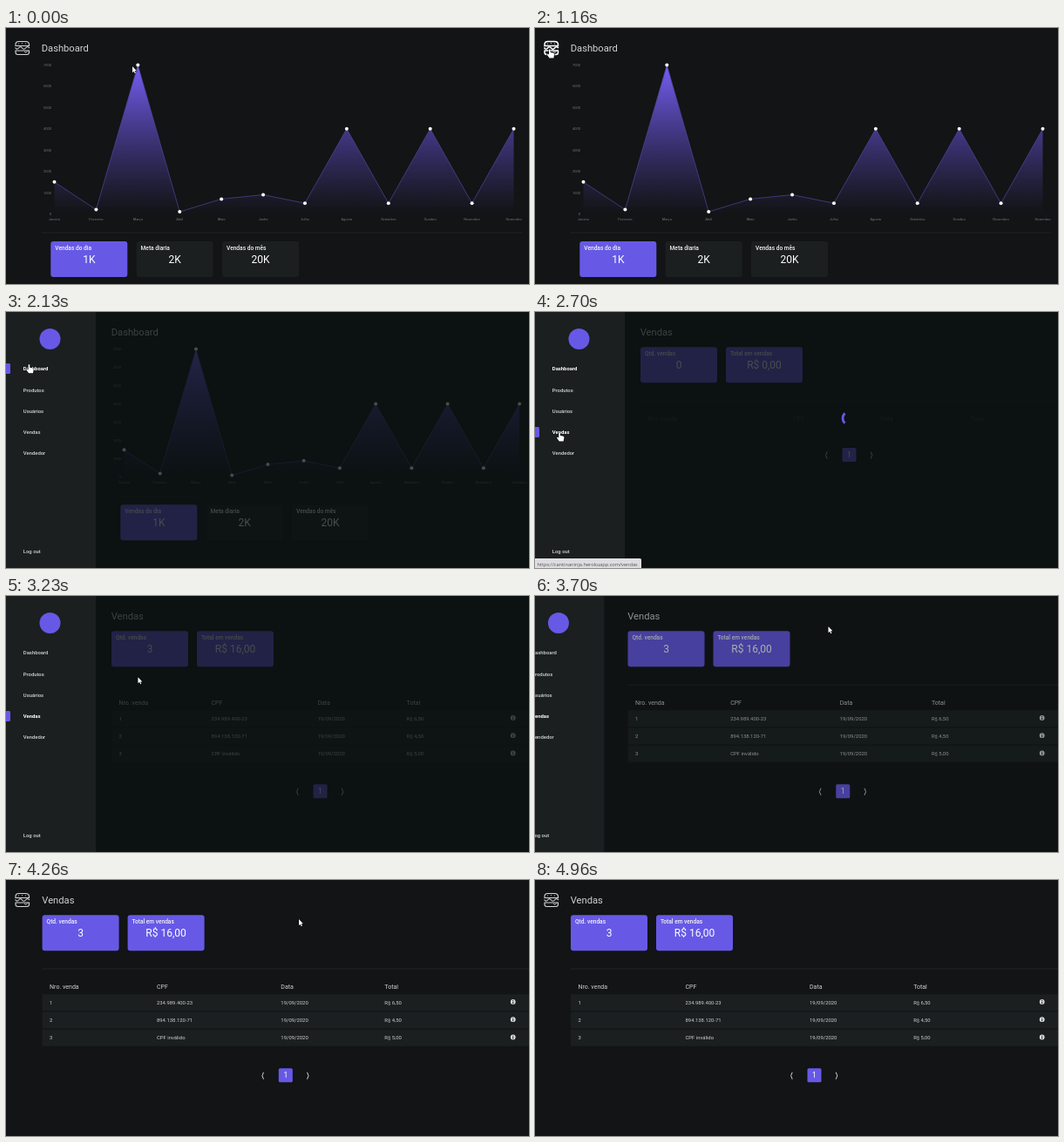
Animation of 600 by 294 pixels, one loop 5 s. Source, as an HTML page with a canvas:

```html
<!DOCTYPE html>
<html lang="pt">
<head>
<meta charset="utf-8">
<title>Dashboard</title>
<style>
html, body { margin: 0; width: 600px; height: 294px; overflow: hidden; background: #121415; }
canvas { display: block; }
</style>
</head>
<body>
<canvas id="stage" width="600" height="294"></canvas>
<script>
const ctx = document.getElementById('stage').getContext('2d');
const LOOP = 5000, SIDE = 103, PURPLE = '#6759e6';
const PAGE_SWITCH = 2680, DATA_READY = 3060;
const months = ['Janeiro', 'Fevereiro', 'Março', 'Abril', 'Maio', 'Junho', 'Julho',
  'Agosto', 'Setembro', 'Outubro', 'Novembro', 'Dezembro'];
const sales = [1500, 200, 7000, 100, 700, 900, 500, 4000, 500, 4000, 500, 4000];
const orders = [
  ['1', '234.989.400-23', '19/09/2020', 'R$ 6,50'],
  ['2', '894.138.120-71', '19/09/2020', 'R$ 4,50'],
  ['3', 'CPF inválido', '19/09/2020', 'R$ 5,00']
];
const menu = [['Dashboard', 67.2], ['Produtos', 91.7], ['Usuários', 115.7], ['Vendas', 140.2],
  ['Vendedor', 164.2], ['Log out', 276.8]];
// pointer path: time, x, y
const path = [[0, 145, 44], [90, 143, 43], [530, 26, 31], [760, 16, 24], [1160, 16, 24], [1300, 19, 24],
  [1960, 19, 24], [2160, 26, 62], [2520, 27.3, 138], [2840, 27.3, 138], [3120, 110, 105],
  [3520, 330, 42], [3700, 336.5, 35], [3940, 336, 45], [5000, 336, 45]];

// cubic-bezier(.25, .8, .25, 1)
function ease(p) {
  if (p <= 0) return 0;
  if (p >= 1) return 1;
  let lo = 0, hi = 1;
  for (let i = 0; i < 20; i++) {
    const u = (lo + hi) / 2;
    if (.75 * u * (1 - u) + u ** 3 < p) lo = u; else hi = u;
  }
  return 2.4 * lo * (1 - lo) ** 2 + 3 * lo * lo * (1 - lo) + lo ** 3;
}

function openness(t, start, openMs, end, closeMs) {
  return t < end ? ease((t - start) / openMs) : 1 - ease((t - end) / closeMs);
}

function pointerAt(t) {
  const i = path.findIndex(p => p[0] > t);
  const [t0, x0, y0] = path[i - 1], [t1, x1, y1] = path[i];
  const p = (t - t0) / (t1 - t0), k = p * p * (3 - 2 * p);
  return [x0 + (x1 - x0) * k, y0 + (y1 - y0) * k];
}

function text(s, x, y, size, color = '#d0d2d3', weight = 400, align = 'left', family = 'Roboto') {
  ctx.font = `${weight} ${size}px ${family}, sans-serif`;
  ctx.fillStyle = color;
  ctx.textAlign = align;
  ctx.fillText(s, x, y);
}

function box(x, y, w, h, color, r = 0) {
  ctx.fillStyle = color;
  ctx.beginPath();
  ctx.roundRect(x, y, w, h, r);
  ctx.fill();
}

function dot(x, y, r, color) {
  ctx.fillStyle = color;
  ctx.beginPath();
  ctx.arc(x, y, r, 0, 7);
  ctx.fill();
}

function stroke(d, color, width) {
  ctx.strokeStyle = color;
  ctx.lineWidth = width;
  ctx.stroke(new Path2D(d));
}

function card(x, y, label, value, color = PURPLE) {
  box(x, y, 88, 41, color, 3);
  text(label, x + 5, y + 10, 6.6, '#f4f4f6', 500);
  text(value, x + 44, y + 25, 12, '#fff', 400, 'center');
}

function burger(hover) {
  const c = hover ? '#fff' : '#d3d7d8', w = hover ? 1.5 : 1.1;
  stroke('M11 20.5V19Q11 15.5 14.5 15.5H22.5Q26.5 15.5 26.5 19V20.5Z', c, w);
  stroke('M10.5 22.5Q12.5 25.5 14.5 23T18.5 23T22.5 23T27 23', c, w);
  stroke('M10.5 26H27M11 26V28Q11 30.5 13.5 30.5H24Q26.5 30.5 26.5 28V26', c, w);
  stroke('M14 18H15M18 17.5H19M22 18H23M21 27L23 28.5L25 26', c, .8);
}

function dashboard(left) {
  text('Dashboard', left - .3, 27, 11.2);
  const x0 = left + 14.5, span = 527 - (left - 41) * .918, h = 171 * span / 527;
  const base = 42.5 + h;
  const px = i => x0 + span * i / 11, py = v => base - h * v / 7000;
  for (let v = 0; v <= 7000; v += 1000) text(v, left + 11, py(v) + 1.5, 4, '#70747a', 400, 'right');
  const line = new Path2D(sales.map((v, i) => `${i ? 'L' : 'M'}${px(i)} ${py(v)}`).join(''));
  const area = new Path2D(line);
  area.lineTo(px(11), base);
  area.lineTo(px(0), base);
  const fill = ctx.createLinearGradient(0, 42, 0, base);
  fill.addColorStop(0, 'rgba(117,96,246,1)');
  fill.addColorStop(1, 'rgba(90,70,190,0)');
  ctx.fillStyle = fill;
  ctx.fill(area);
  ctx.strokeStyle = '#5047a0';
  ctx.lineWidth = .7;
  ctx.stroke(line);
  sales.forEach((v, i) => {
    dot(px(i), py(v), 2, '#fff');
    text(months[i], px(i), base + 7.5, 4, '#70747a', 400, 'center');
  });
  box(left, base + 21, 551, 1, '#212425');
  const y = base + 31.5;
  card(left + 10.3, y, 'Vendas do dia', '1K');
  card(left + 108.6, y, 'Meta diaria', '2K', '#1b1f20');
  card(left + 207, y, 'Vendas do mês', '20K', '#1b1f20');
}

function salesPage(left, ready) {
  const w = 600 - left, mid = left + w / 2;
  text('Vendas', left - .3, 27, 11.2);
  card(left, 40.2, 'Qtd. vendas', ready ? '3' : '0');
  card(left + 98, 40.2, 'Total em vendas', ready ? 'R$ 16,00' : 'R$ 0,00');
  box(left, 101.5, w, 1, '#212425');
  const cols = ready ? [8.5, 13 + .212 * w, 11.3 + .47 * w, 11.9 + .682 * w] : [8.5, 175, 275, 379];
  ctx.globalAlpha = ready ? 1 : .2;
  ['Nro. venda', 'CPF', 'Data', 'Total'].forEach((s, i) => text(s, left + cols[i], 124.5, 7));
  ctx.globalAlpha = 1;
  if (ready) orders.forEach((row, r) => {
    const y = 140.7 + r * 20.3;
    box(left, y - 9.5, w, 19, '#1b1f20');
    row.forEach((s, i) => text(s, left + cols[i], y + 2.1, 5.9));
    dot(581.7, y - .8, 2.9, '#d6d8d9');
    box(581.2, y - 1, 1, 2.2, '#1b1f20');
    box(581.2, y - 2.6, 1, 1, '#1b1f20');
  });
  const y = ready ? 224.3 : 164;
  box(mid - 8, y - 8, 16, 16, PURPLE, 1.5);
  text('1', mid, y + 3, 8.5, '#fff', 400, 'center');
  stroke(`M${mid - 25.3} ${y - 3.5}l-1.6 4l1.6 4M${mid + 24.7} ${y - 3.5}l1.6 4l-1.6 4`, '#d0d2d3', 1);
}

function sidebar(x, t) {
  if (x <= -SIDE) return;
  const onSales = t > 2430;
  box(x, 0, SIDE, 294, '#1b1f20');
  dot(x + 50.5, 31, 12, PURPLE);
  box(x, onSales ? 132 : 59, 5, 12, PURPLE, [0, 1.5, 1.5, 0]);
  for (const [label, y] of menu) {
    const active = label === 'Dashboard' ? t < 2900 : label === 'Vendas' && onSales;
    text(label, x + 19.8, y, 5.9, active ? '#fff' : '#d3d6d7', active ? 700 : 500);
  }
}

function pointer(x, y, hand) {
  const shape = new Path2D(hand
    ? 'M0 .8Q.9-.4 1.7.8V4L5 4.6Q6.3 5 6.1 6.5L5.4 10.5H.4L-2.3 6.6Q-2.3 5.3-1 5.8L0 6.7Z'
    : 'M0 0V7.2L1.7 5.7L2.8 8.2L3.9 7.7L2.8 5.3H5Z');
  ctx.save();
  ctx.translate(x, y);
  ctx.strokeStyle = '#000';
  ctx.lineWidth = 1;
  ctx.stroke(shape);
  ctx.fillStyle = '#fff';
  ctx.fill(shape);
  ctx.restore();
}

function draw(t) {
  const slide = openness(t, 1208, 540, 3663, 540);
  const left = 41 + 80 * openness(t, 1203, 770, 3658, 770);
  const shade = .75 * openness(t, 1195, 500, 3612, 500);
  const [x, y] = pointerAt(t);
  const overBurger = x < 29 && y < 33 && slide === 0;
  const ready = t >= DATA_READY;

  box(0, 0, 600, 294, '#121415');
  burger(overBurger);
  if (t < PAGE_SWITCH) dashboard(left); else salesPage(left, ready);
  box(0, 0, 600, 294, `rgba(10,16,16,${shade})`);
  if (t >= PAGE_SWITCH && !ready) {
    const a = Math.PI + (t - 2700) / 800 * 2 * Math.PI;
    ctx.strokeStyle = PURPLE;
    ctx.lineWidth = 2.8;
    ctx.beginPath();
    ctx.arc(left + 239.5, 122, 7.5, a - .85, a + .85);
    ctx.stroke();
  }
  sidebar((slide - 1) * SIDE, t);
  if (t > 2430 && t < 3090) {
    box(0, 283, 122, 11, '#dfdde1', [0, 1.5, 0, 0]);
    text('https://cantinaninja.herokuapp.com/vendas', 2.5, 291.5, 5.65, '#4c4e52', 400, 'left', 'Open Sans');
  }
  const overMenu = t > 2100 && t < 2870;
  if (t < 4600) pointer(x, y, overBurger || overMenu);
}

function frame(now) {
  draw(now % LOOP);
  requestAnimationFrame(frame);
}
requestAnimationFrame(frame);
</script>
</body>
</html>
```
